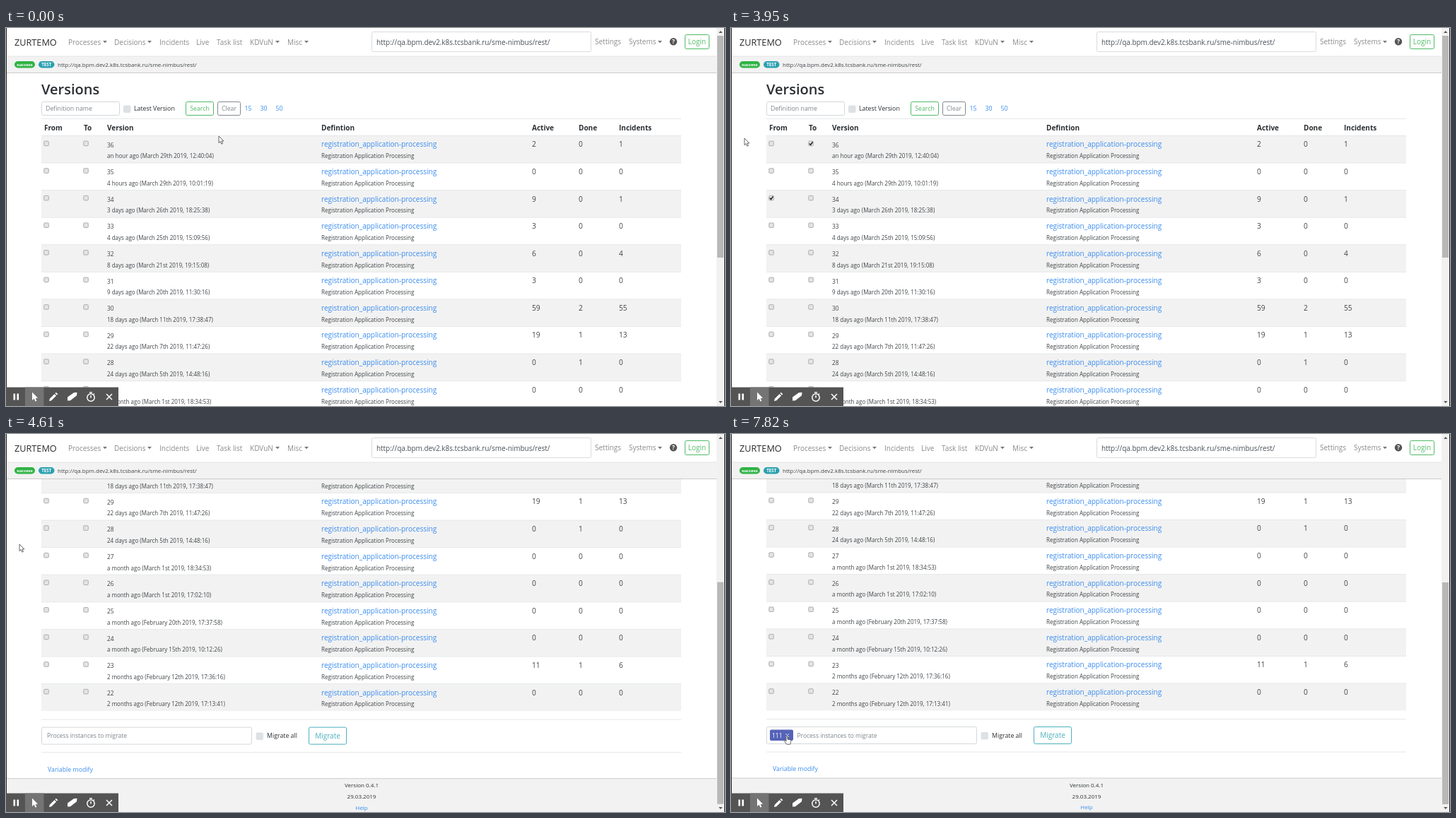
An HTML page that plays this animation: 1017x535 px, repeating every 8000 ms.

```html
<!DOCTYPE html>
<html lang="en">
<head>
<meta charset="utf-8">
<title>Versions</title>
<style>
  html, body { margin: 0; width: 100%; height: 100%; overflow: hidden; background: #fff; }
  svg { display: block; width: 1017px; height: 535px; font: 10px "Open Sans", "Noto Sans", sans-serif; }
  text { white-space: pre; }
</style>
</head>
<body>
<svg id="stage" viewBox="0 0 1017 535"></svg>
<script>
const LOOP = 8000, PAGE = 339.6, ROW = 38.58, TOP = 152.4;
const INK = '#2b2f33', SOFT = '#3f4347', GREY = '#8b8b8b', LINK = '#3a8cee', GREEN = '#4fba66', TEAL = '#2ba0b0',
      PALE_TEAL = '#4cb0bd', LINE = '#e6e8ea', SHADE = '#f2f2f2', HINT = '#7d848a';

function add(parent, tag, attrs = {}) {
  const node = document.createElementNS('http://www.w3.org/2000/svg', tag);
  for (const key in attrs) node.setAttribute(key, attrs[key]);
  return parent.appendChild(node);
}
const group = parent => add(parent, 'g');
const rect = (p, x, y, width, height, fill, more) => add(p, 'rect', { x, y, width, height, fill, ...more });
const path = (p, d, more) => add(p, 'path', { d, fill: 'none', ...more });
function text(p, x, y, str, size = 10, fill = INK, more = {}) {
  const node = add(p, 'text', { x, y, 'font-size': size, fill, ...more });
  node.textContent = str;
  return node;
}
const box = (p, x, y, w, h, stroke, rx = 2) => rect(p, x, y, w, h, '#fff', { stroke, rx });
const bold = { 'font-weight': 700 }, centred = { 'text-anchor': 'middle' };
const show = (node, on) => node.setAttribute('visibility', on ? 'visible' : 'hidden');

function button(p, x, y, w, h, label, color, size) {
  box(p, x, y, w, h, color);
  text(p, x + w / 2, y + h / 2 + size * .35, label, size, color, centred);
}
function checkbox(p, x, y) {
  rect(p, x, y, 6.5, 6.5, '#e4e4e4', { stroke: '#adadad', rx: 1 });
  const tick = path(p, `M${x + 1} ${y + 3.2}l1.8 2l3-4.2`, { stroke: '#222', 'stroke-width': 1.5 });
  show(tick, false);
  return tick;
}

const stage = document.getElementById('stage');
rect(stage, 0, 0, 1017, 535, '#fff');

// Scrolling page
const page = group(stage);
text(page, 50, 94, 'Versions', 20, INK, { 'font-weight': 600 });
box(page, 50.5, 104.5, 110, 19, '#d3d7db');
text(page, 56, 117.3, 'Definition name', 8.8, HINT);
rect(page, 166, 109.5, 10.5, 10.5, '#dee1e4', { rx: 2 });
text(page, 181, 117.3, 'Latest Version', 8.8);
button(page, 254.5, 104.5, 39, 19, 'Search', GREEN, 8.8);
button(page, 299.5, 104.5, 32, 19, 'Clear', '#82888e', 8.8);
[[337.5, 15], [359.5, 30], [381.5, 50]].forEach(([x, n]) => text(page, x, 117.3, n, 8.8, LINK));

rect(page, 50, 128, 905, 1, LINE);
[[54, 'From'], [110, 'To'], [143, 'Version'], [446, 'Defintion'], [744, 'Active'], [810, 'Done'], [867, 'Incidents']]
  .forEach(([x, label]) => text(page, x, 144.8, label, 10, INK, bold));

const rows = [
  'an hour ago (March 29th 2019, 12:40:04)|2 0 1',
  '4 hours ago (March 29th 2019, 10:01:19)|0 0 0',
  '3 days ago (March 26th 2019, 18:25:38)|9 0 1',
  '4 days ago (March 25th 2019, 15:09:56)|3 0 0',
  '8 days ago (March 21st 2019, 19:15:08)|6 0 4',
  '9 days ago (March 20th 2019, 11:30:16)|3 0 0',
  '18 days ago (March 11th 2019, 17:38:47)|59 2 55',
  '22 days ago (March 7th 2019, 11:47:26)|19 1 13',
  '24 days ago (March 5th 2019, 14:48:16)|0 1 0',
  'a month ago (March 1st 2019, 18:34:53)|0 0 0',
  'a month ago (March 1st 2019, 17:02:10)|0 0 0',
  'a month ago (February 20th 2019, 17:37:58)|0 0 0',
  'a month ago (February 15th 2019, 10:12:26)|0 0 0',
  '2 months ago (February 12th 2019, 17:36:16)|11 1 6',
  '2 months ago (February 12th 2019, 17:13:41)|0 0 0'
];
const ticks = rows.map((row, i) => {
  const y = TOP + i * ROW, [date, counts] = row.split('|');
  if (i % 2 === 0) rect(page, 50, y, 905, ROW, SHADE);
  rect(page, 50, y - .5, 905, 1, LINE);
  const from = checkbox(page, 53.8, y + 7.8), to = checkbox(page, 109.8, y + 7.8);
  text(page, 143, y + 16.2, 36 - i, 8.4, SOFT);
  text(page, 143, y + 31.9, date, 8.02, SOFT);
  text(page, 446, y + 16, 'registration_application-processing', 10.04, LINK);
  text(page, 446, y + 31.9, 'Registration Application Processing', 8.05, SOFT);
  counts.split(' ').forEach((n, k) => text(page, [744, 810, 867][k], y + 16, n, 10.1, SOFT));
  return { from, to };
});

const form = add(page, 'g', { transform: `translate(0 ${PAGE})` });
rect(form, 50, 403, 905, 1, LINE);
box(form, 50.5, 414.5, 297, 24, '#d3d7db');
const hint = text(form, 58, 429.8, 'Process instances to migrate', 8.5, HINT);
const typed = text(form, 58, 429.8, '', 8.5);
const caret = rect(form, 67, 421, 1, 11, '#222');
const tag = group(form);
rect(tag, 55, 418.5, 33, 15.5, '#5563b8', { rx: 2 });
text(tag, 58, 429.8, '111', 8.5, '#fff');
path(tag, 'M77 424l5 5m0-5l-5 5', { stroke: '#dfe2f4' });
rect(form, 353.5, 422, 10.5, 10.5, '#dee1e4', { rx: 2 });
text(form, 369, 429.8, 'Migrate all', 8.8);
button(form, 428.5, 414.5, 53, 24, 'Migrate', PALE_TEAL, 10);
rect(form, 50, 449.5, 905, 1, LINE);
text(form, 59, 477.3, 'Variable modify', 8.8, LINK);
rect(form, 1, 487, 1005, 50, SHADE);
rect(form, 1, 486.5, 1005, 1, '#cfcfcf');
text(form, 503, 499.5, 'Version 0.4.1', 8, INK, centred);
text(form, 503, 515.5, '29.03.2019', 8, INK, centred);
text(form, 503, 531, 'Help', 8, LINK, centred);

// Fixed header
rect(stage, 0, 0, 1017, 40, '#fff');
rect(stage, 0, 40, 1017, 24, SHADE);
rect(stage, 0, 39.5, 1017, 1, '#e6e6e6');
rect(stage, 0, 63, 1017, 1, '#cbcbcb');
text(stage, 12, 24.8, 'ZURTEMO', 12.7, '#2a2a2a');
[[88, 'Processes', 137], [153, 'Decisions', 200], [217, 'Incidents'], [269, 'Live'], [298, 'Task list'],
 [345, 'KDVuN', 381], [398, 'Misc', 422], [833, 'Settings'], [881, 'Systems', 922]].forEach(([x, label, arrow]) => {
  text(stage, x, x > 800 ? 23 : 23.8, label, 10, GREY);
  if (arrow) path(stage, `M${arrow} 18h6l-3 3.2z`, { fill: '#777' });
});
const address = 'http://qa.bpm.dev2.k8s.tcsbank.ru/sme-nimbus/rest/';
box(stage, 517.5, 5.5, 310, 28, '#d8dbde');
text(stage, 524, 24, address, 9.95, '#495057');
add(stage, 'circle', { cx: 944, cy: 19.3, r: 5.2, fill: '#555' });
text(stage, 944, 22.3, '?', 8.5, '#fff', { ...bold, ...centred });
button(stage, 960.5, 9.5, 34, 20, 'Login', GREEN, 10);
rect(stage, 12, 47, 29, 9.5, '#2fb344', { rx: 4.7 });
text(stage, 26.5, 53.8, 'success', 6, '#fff', { ...bold, ...centred });
rect(stage, 46, 47, 22.5, 9.5, TEAL, { rx: 4.7 });
text(stage, 57.2, 54, 'TEST', 6.2, '#fff', { ...bold, ...centred });
text(stage, 73, 54.6, address, 7.97, SOFT);

// Scrollbar and window edges
rect(stage, 1005, 0, 11, 535, '#f1f1f1');
const thumb = rect(stage, 1006, 11, 9, 314, '#b8b8b8');
path(stage, 'M1008 7h5.5l-2.7-3zM1008 528h5.5l-2.7 3z', { fill: '#555' });
rect(stage, 0, 0, 1, 535, '#222');
rect(stage, 1016, 0, 1, 535, '#222');

// Recorder toolbar
rect(stage, 0, 508.5, 159, 27, '#545454');
rect(stage, 27, 508.5, 26.5, 27, '#747474');
const white = { fill: '#fff' }, stroke = { stroke: '#fff', 'stroke-width': 1.5 };
path(stage, 'M10.5 517.5h2.6v9h-2.6zM15.5 517.5h2.6v9h-2.6z', white);
path(stage, 'M37 515.5v11.5l2.7-2.4l1.8 4l1.9-.9l-1.8-3.8l3.4-.2z', white);
path(stage, 'M61 528l.8-3.3l6.8-6.8l2.5 2.5l-6.8 6.8zM69.4 517.1l1.5-1.4l2.5 2.5l-1.5 1.4z', white);
path(stage, 'M87 522.5l9-6.5l4.5-.3l-.5 4.5l-9 7l-4 .3z', white);
add(stage, 'circle', { cx: 120, cy: 523, r: 5.2, fill: 'none', ...stroke });
path(stage, 'M118 515.8h4M120 520v3.4M124 518.5l1-1', stroke);
path(stage, 'M142 518l8 8m0-8l-8 8', stroke);

// Pointer
const ring = add(stage, 'circle', { fill: '#e0505a', 'fill-opacity': .08, stroke: '#dc5560', 'stroke-width': 1.4 });
const pointer = group(stage);
const outline = { fill: '#fff', stroke: '#555', 'stroke-width': .9, 'stroke-linejoin': 'round' };
const arrow = path(pointer, 'M0 0v9.6l2.2-2l1.6 3.6l1.7-.7l-1.6-3.5h3z', outline);
const hand = path(pointer, 'M0 1q1-1.6 2 0v4l4 .9q1 .4 .8 1.7l-1 4.6h-5l-3.6-4.7q0-1.4 1.4-.8l1.4 1.2z', outline);

// The screen refreshes in bursts: [first, last, count]
const refreshes = [
  [0, 0, 1], [100, 1030, 8], [1220, 1660, 4], [1830, 2240, 4], [2380, 2900, 4], [3270, 3270, 1], [3420, 3950, 4],
  [4330, 4610, 3], [4740, 5300, 4], [5480, 5930, 4], [6260, 6720, 4], [6860, 7270, 3], [7410, 7820, 4]
].flatMap(([a, b, n]) => Array.from({ length: n }, (_, i) => a + (b - a) * i / (n - 1 || 1)));

// Keyframes: [time, ...values]
const moves = [
  [0, 301, 153], [1030, 85, 239], [1090, 85, 239], [1660, 57, 242], [1830, 57, 242], [2240, 111, 164],
  [2380, 114, 163.5], [3270, 114, 163.5], [3950, 19, 156], [4610, 19, 156], [5300, 62, 394],
  [5930, 131, 434], [6260, 131, 434], [6720, 134, 437], [6860, 134, 437], [7270, 164, 445], [7820, 78, 427]
];
const scrolls = [[4200, 0], [4330, 123.4], [4470, 262], [4610, 339], [4740, PAGE]];
// Clicks: [start, ring settled, end, widest radius]
const clicks = [[1830, 1966, 2100, 14], [2380, 2726, 3420, 23], [6260, 6413, 6560, 14]];

function sample(keys, t) {
  const next = keys.findIndex(k => k[0] > t);
  if (next < 0) return keys[keys.length - 1].slice(1);
  if (next === 0) return keys[0].slice(1);
  const a = keys[next - 1], b = keys[next];
  const u = (t - a[0]) / (b[0] - a[0]), e = u * u * (3 - 2 * u);
  return a.slice(1).map((v, i) => v + (b[i + 1] - v) * e);
}

function draw(now) {
  const time = now % LOOP;
  const t = refreshes.filter(s => s <= time).pop();
  const [x, y] = sample(moves, t), [scroll] = sample(scrolls, t);

  page.setAttribute('transform', `translate(0 ${-scroll})`);
  thumb.setAttribute('y', 11 + scroll * .586);
  pointer.setAttribute('transform', `translate(${x} ${y})`);
  const overTag = t > 7000 && x < 88;
  show(arrow, !overTag);
  show(hand, overTag);

  const click = clicks.find(c => t >= c[0] && t < c[2]);
  show(ring, click);
  if (click) {
    const [r] = sample([[click[0], click[3]], [click[1], 7.3]], t);
    for (const [key, value] of Object.entries({ cx: x + .5, cy: y + .3, r })) ring.setAttribute(key, value);
  }
  show(ticks[2].from, t >= 1830);
  show(ticks[0].to, t >= 2550);

  const tagged = t > 7000, focused = t >= 6260 && !tagged;
  const count = [6560, 6720, 6860].filter(s => t >= s).length;
  typed.textContent = focused ? '1'.repeat(count) : '';
  caret.setAttribute('x', 57.5 + count * 4.86);
  show(caret, focused);
  show(hint, !focused);
  hint.setAttribute('x', tagged ? 93.5 : 58);
  show(tag, tagged);
}

const start = performance.now();
(function loop() {
  draw(performance.now() - start);
  requestAnimationFrame(loop);
})();
</script>
</body>
</html>
```
